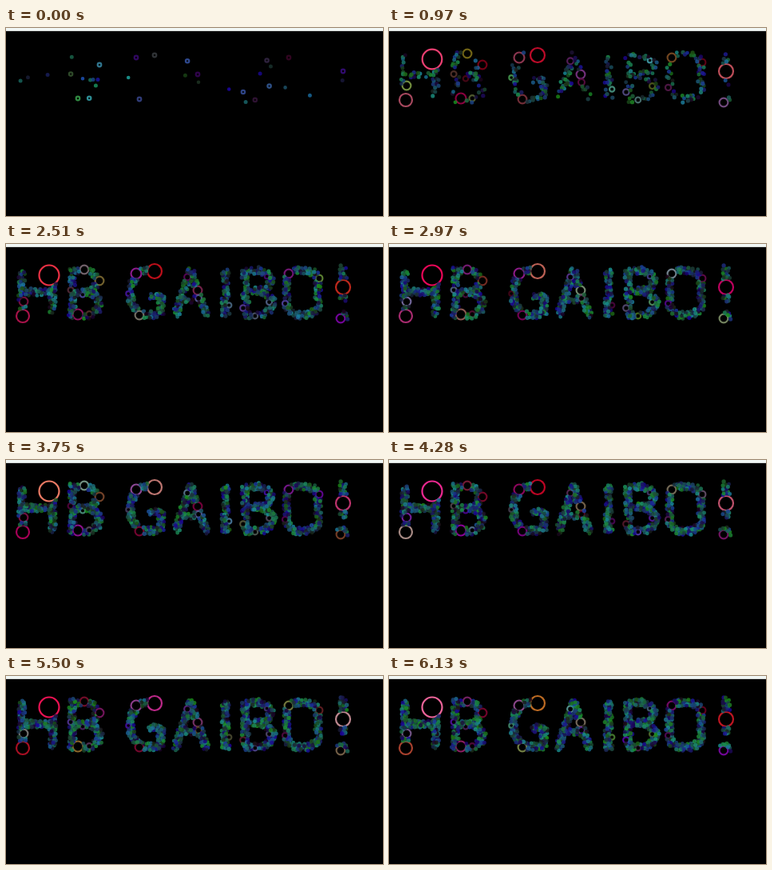
An HTML page for the animation above (6300 ms loop, 472 by 235 pixels).

```html
<!DOCTYPE html>
<html lang="en">
<head>
<meta charset="utf-8">
<title>HB GAIBO!</title>
<style>
html, body { margin: 0; width: 100%; height: 100%; overflow: hidden; background: #000; }
svg { display: block; width: 100vw; height: 100vh; }
</style>
</head>
<body>
<svg id="stage" viewBox="0 0 472 235">
  <rect width="472" height="235" fill="#000"/>
  <rect width="472" height="3.85" fill="#f2f8f6"/>
  <path id="letters" fill="none" d="M20 33V89M58 33V89M20 60H58
    M83 33V89M83 33H98C119 33 119 59 99 60H83M99 60C123 60 123 89 99 89H83
    M194 36C170 26 156 40 156 61C156 84 172 93 194 87V65H181
    M212 90L231 33L251 90M220 70H243
    M275 33V89
    M300 33V89M300 33H313C337 33 337 59 313 59H300M313 59C341 59 341 89 313 89H300
    M351 49Q351 33 371 33Q391 33 391 49V73Q391 89 371 89Q351 89 351 73Z
    M422 30V70M418 88h6v4h-6"/>
  <g id="dots" fill="none"></g>
</svg>
<script>
const LOOP = 6300;
const SEEDS = 30;      // small circles present from the start
const PER_STEP = 85;   // attempts to place a dot in each step
const DOT_GAP = 2;
const SPREAD = 4.8;    // half width of the letter strokes

// Step times: six even runs of nine, then a slower, uneven ending.
const steps = [0];
for (let i = 0; i < 54; i++)
  steps.push(590 + 690 * Math.floor(i / 9) + Math.round(7.65 * (i % 9)) * 10);
let time = 4740;
for (const wait of [0, 150, 150, 80, 150, 80, 150, 170, 80, 150, 80, 150])
  steps.push(time += wait);

// Big rings: x, y, final radius
const rings = [
  [186, 34, 9], [163, 37, 6.5], [422, 54, 9], [90, 88, 6.5], [240, 58, 5.4],
  [167, 89, 5.4], [117, 46, 5.4], [354, 37, 5.4],
  [54, 39, 12.5], [21, 90, 8], [22, 72, 5.4], [98, 32, 5.4], [419, 93, 5.4], [392, 43, 4.4]
];

let state = 20417;
function rand() {
  state = (state + 0x6D2B79F5) | 0;
  let t = Math.imul(state ^ (state >>> 15), 1 | state);
  t ^= t + Math.imul(t ^ (t >>> 7), 61 | t);
  return ((t ^ (t >>> 14)) >>> 0) / 4294967296;
}

function hash(a, b) {
  let h = Math.imul(a + 1, 374761393) ^ Math.imul(b + 1, 668265263);
  h = Math.imul(h ^ (h >>> 13), 1274126177);
  h = Math.imul(h ^ (h >>> 16), 2246822519);
  return ((h ^ (h >>> 15)) >>> 0) / 4294967296;
}

const layer = document.getElementById("dots");
const letters = document.getElementById("letters");
const span = letters.getTotalLength();
const circles = [];

function add(x, y, r, born, start) {
  const el = document.createElementNS("http://www.w3.org/2000/svg", "circle");
  const isRing = r > 2.6;
  el.setAttribute("cx", x.toFixed(1));
  el.setAttribute("cy", y.toFixed(1));
  el.setAttribute("stroke-width", isRing ? 2.2 : 2.6);
  el.setAttribute("stroke-opacity", isRing ? 1 : 0.85);
  layer.appendChild(el);
  circles.push({ el, x, y, r, born, start, isRing });
}

function isFree(x, y, r) {
  return circles.every(c => {
    const gap = c.isRing || r > 2.6 ? c.r + r : DOT_GAP;
    return Math.hypot(c.x - x, c.y - y) > gap;
  });
}

// Put a circle on a random spot of the letter strokes if there is room.
function scatter(r, born, start) {
  const p = letters.getPointAtLength(rand() * span);
  const angle = rand() * Math.PI * 2;
  const off = SPREAD * Math.sqrt(rand());
  const x = p.x + off * Math.cos(angle);
  const y = p.y + off * Math.sin(angle);
  if (isFree(x, y, r)) add(x, y, r, born, start);
}

rings.forEach(([x, y, r], i) => add(x, y, r, Math.floor(i / 8), 2.3));
for (let i = 0; i < SEEDS; i++)
  scatter(i % 2 ? 1.2 : 2.8 + 1.2 * rand(), 0, i % 4 ? 1.2 : 2.2);
for (let step = 1; step < steps.length; step++)
  for (let i = 0; i < PER_STEP; i++) {
    const r = 1.1 + 0.3 * rand();
    scatter(r, step, r);
  }

// Red follows the size; green and blue change at random in every step.
function colour(i, step, r, isRing) {
  const red = Math.min(235, r * 21);
  const green = hash(i, step * 2) ** (isRing ? 1.6 : 1) * 145;
  const blue = 20 + hash(i, step * 2 + 1) * 135;
  return `rgb(${[red, green, blue].map(Math.round)})`;
}

let shown = -1;
function draw(step) {
  if (step === shown) return;
  shown = step;
  circles.forEach((c, i) => {
    const live = step >= c.born;
    c.el.setAttribute("display", live ? "inline" : "none");
    if (!live) return;
    const r = Math.min(c.r, c.start + 2 * (step - c.born));
    c.el.setAttribute("r", r.toFixed(2));
    c.el.setAttribute("stroke", colour(i, step, r, c.isRing));
  });
}

const begin = performance.now();
function tick() {
  const t = (performance.now() - begin) % LOOP;
  let step = steps.length - 1;
  while (steps[step] > t) step--;
  draw(step);
  requestAnimationFrame(tick);
}
tick();
</script>
</body>
</html>
```
